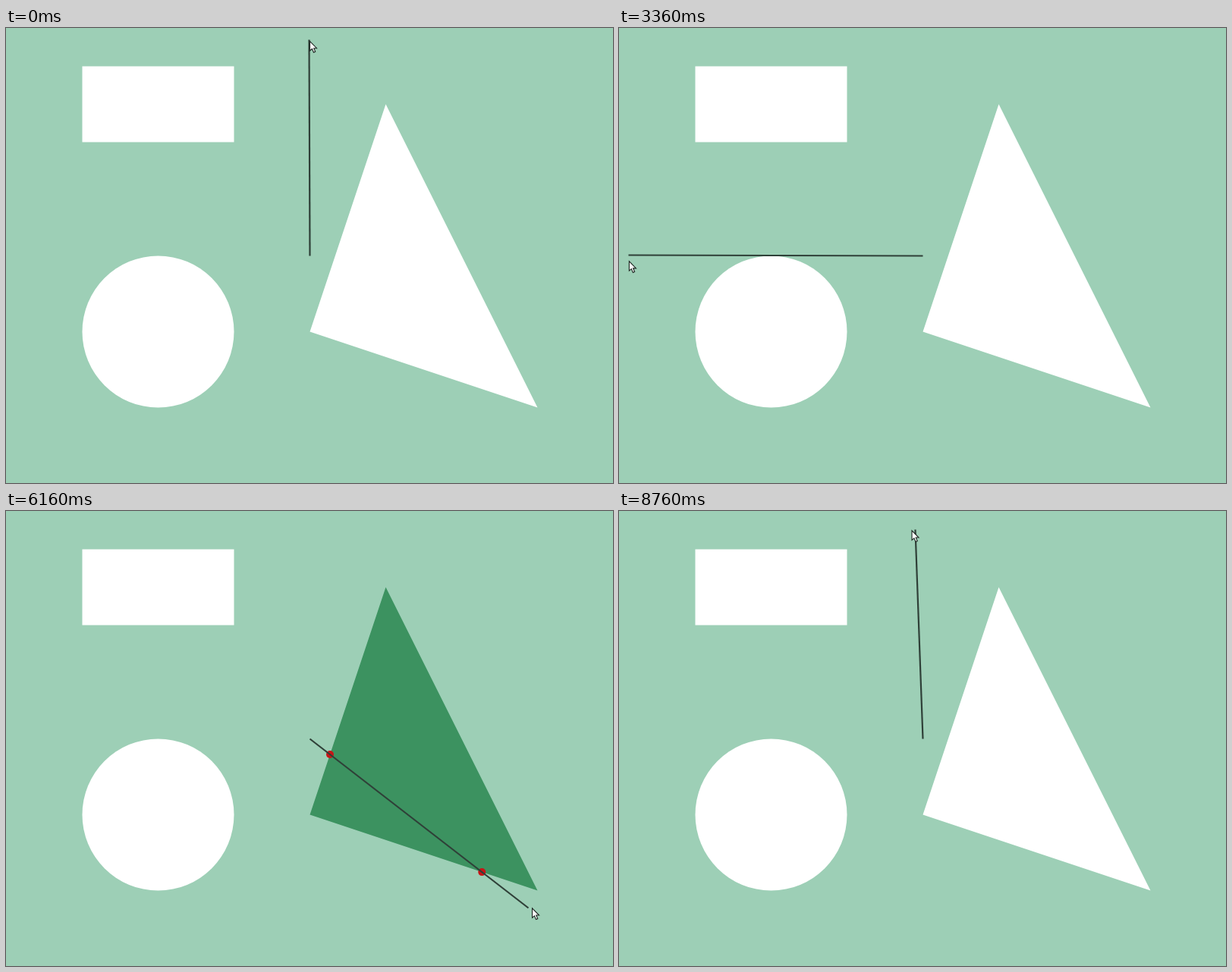
An HTML page with a canvas that plays this animation: 800x600 px, repeating every 8800 ms.

```html
<!DOCTYPE html>
<html lang="en">
<head>
<meta charset="utf-8">
<title>Line collisions</title>
<style>
  html, body { margin: 0; width: 100%; height: 100%; overflow: hidden; background: #9dcfb6; }
  canvas { display: block; }
</style>
</head>
<body>
<canvas id="stage" width="800" height="600"></canvas>
<script>
const ctx = document.getElementById('stage').getContext('2d');
const LOOP = 8800, STEP = 40;
const BG = '#9dcfb6', HIT = '#3c9260', LINE = '#2f4038', DOT = '#c81416';

const anchor = [400, 300];
const rect = [[100, 50], [300, 50], [300, 150], [100, 150]];
const tri = [[400, 400], [500, 100], [700, 500]];
const disc = { x: 200, y: 400, r: 100 };

// way points of the line's free end: step, x, y
const path = [
  [10, 399, 15], [32, 243, 10], [56, 88, 29], [84, 12, 299], [101, 54, 474],
  [110, 127, 537], [124, 275, 580], [154, 688, 523], [170, 752, 435],
  [179, 757, 313], [193, 682, 150], [216, 418, 28], [219, 390, 24]
];
const last = path.length - 1;

function slope(i, axis) {
  if (i < 0) return 0;
  const j = Math.min(i, last - 1), a = path[j], b = path[j + 1];
  return (b[axis] - a[axis]) / (b[0] - a[0]);
}

// the harmonic mean of both slopes keeps the curve from overshooting
function speed(i, axis) {
  const a = slope(i - 1, axis), b = slope(i, axis);
  return a * b > 0 ? 2 * a * b / (a + b) : 0;
}

function hermite(a, b, va, vb, u) {
  const w = 1 - u;
  return a * w * w * (1 + 2 * u) + b * u * u * (3 - 2 * u) + va * u * w * w - vb * u * u * w;
}

function tipAt(step) {
  const s = Math.min(Math.max(step, path[0][0]), path[last][0]);
  const i = Math.max(1, path.findIndex(p => p[0] >= s));
  const a = path[i - 1], b = path[i], span = b[0] - a[0];
  return [1, 2].map(axis => hermite(a[axis], b[axis],
    speed(i - 1, axis) * span, speed(i, axis) * span, (s - a[0]) / span));
}

const cross = (ax, ay, bx, by) => ax * by - ay * bx;
const inside = u => u >= 0 && u <= 1;

function polyHits(points, tip) {
  const [x, y] = anchor, dx = tip[0] - x, dy = tip[1] - y;
  return points.flatMap(([px, py], i) => {
    const [qx, qy] = points[(i + 1) % points.length];
    const ex = qx - px, ey = qy - py, den = cross(dx, dy, ex, ey);
    const s = cross(px - x, py - y, ex, ey) / den;
    const u = cross(px - x, py - y, dx, dy) / den;
    return inside(s) && inside(u) ? [[x + s * dx, y + s * dy]] : [];
  });
}

function discHits(tip) {
  const [x, y] = anchor, dx = tip[0] - x, dy = tip[1] - y;
  const fx = x - disc.x, fy = y - disc.y;
  const a = dx * dx + dy * dy, b = fx * dx + fy * dy;
  const root = b * b - a * (fx * fx + fy * fy - disc.r ** 2);
  if (root < 0) return [];
  return [-1, 1].map(k => (-b + k * Math.sqrt(root)) / a)
    .filter(inside)
    .map(s => [x + s * dx, y + s * dy]);
}

function fillPoly(points, color) {
  ctx.beginPath();
  points.forEach(p => ctx.lineTo(...p));
  ctx.fillStyle = color;
  ctx.fill();
}

function fillCircle(x, y, r, color) {
  ctx.beginPath();
  ctx.arc(x, y, r, 0, 2 * Math.PI);
  ctx.fillStyle = color;
  ctx.fill();
}

const arrow = new Path2D('M0 0V12.5L2.9 10L5 14.8L7.2 13.8L5.2 9.2H9Z');

function drawCursor(x, y) {
  ctx.save();
  ctx.translate(x, y);
  ctx.fillStyle = '#fff';
  ctx.strokeStyle = '#1c2420';
  ctx.lineWidth = 1.1;
  ctx.fill(arrow);
  ctx.stroke(arrow);
  ctx.restore();
}

function draw(step) {
  const tip = tipAt(step), prev = tipAt(step - 1);
  const hits = [polyHits(rect, tip), discHits(tip), polyHits(tri, tip)];
  const [rectFill, discFill, triFill] = hits.map(h => h.length ? HIT : '#fff');

  ctx.setTransform(1, 0, 0, 1, 0, 0);
  ctx.fillStyle = BG;
  ctx.fillRect(0, 0, 800, 600);
  ctx.translate(0.5, 0.5);

  fillPoly(rect, rectFill);
  fillCircle(disc.x, disc.y, disc.r, discFill);
  fillPoly(tri, triFill);
  hits.flat().forEach(([x, y]) => fillCircle(x, y, 5, DOT));

  ctx.beginPath();
  ctx.moveTo(...anchor);
  ctx.lineTo(...tip);
  ctx.strokeStyle = LINE;
  ctx.lineWidth = 2.2;
  ctx.stroke();

  // the pointer runs about half a step ahead of the line
  const [cx, cy] = tip.map((v, i) => v + (v - prev[i]) * 0.6);
  drawCursor(cx + 1, cy + 2);
}

const start = performance.now();

function tick() {
  const t = (performance.now() - start) % LOOP;
  draw(Math.floor((t + 0.5) / STEP));
  requestAnimationFrame(tick);
}
tick();
</script>
</body>
</html>
```
